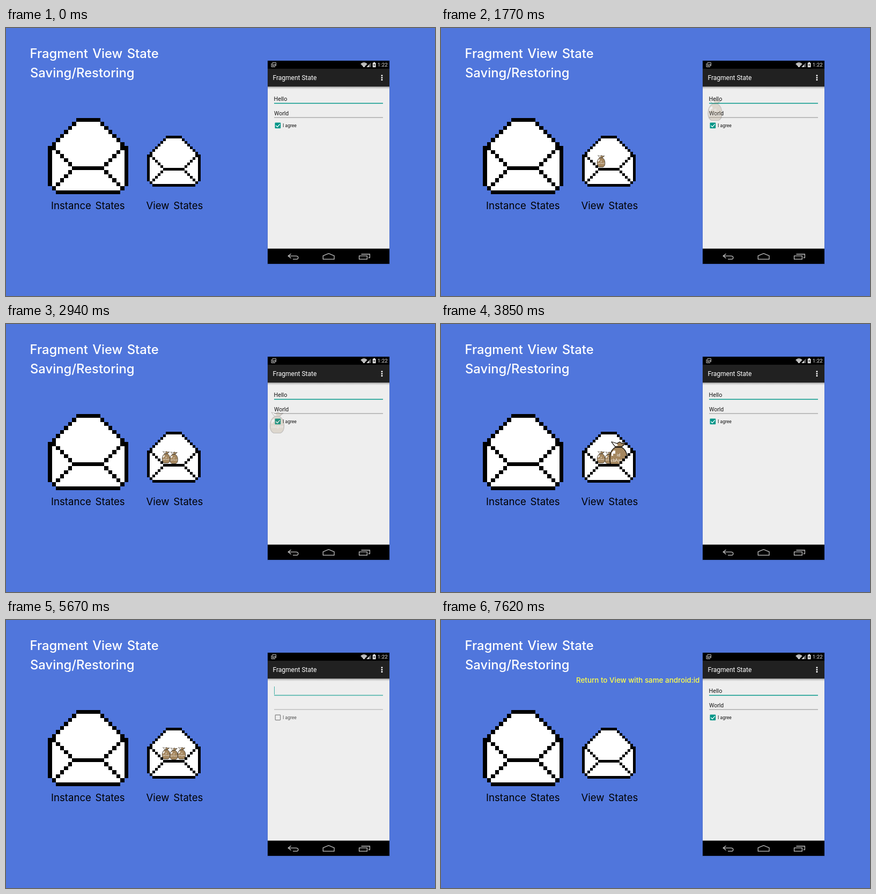
Animation of 800 by 500 pixels, one loop 8.65 s. Source, as an HTML page:

```html
<!DOCTYPE html>
<html lang="en">
<head>
<meta charset="utf-8">
<title>Fragment View State</title>
<style>
  html, body { margin: 0; width: 100%; height: 100%; overflow: hidden; background: #5076dc; }
  svg { display: block; width: 800px; height: 500px; }
  text { font-family: Inter, "Open Sans", sans-serif; }
  .ui text { font-family: Roboto, Arial, sans-serif; fill: #151515; }
  .ui .light { fill: #fff; }
  .title { font-size: 23.8px; font-weight: 500; word-spacing: 2px; fill: #fff; }
  .label { font-size: 18.6px; word-spacing: 2.5px; }
  .note { font-size: 13.4px; font-weight: 500; fill: #ffff48; }
  .line { fill: none; stroke: #c4c4c4; stroke-width: 1.3; }
  .tag { font-size: 7.3px; fill: #fff; text-anchor: middle; }
</style>
</head>
<body>
<svg viewBox="0 0 800 500">
  <defs>
    <linearGradient id="shade" x2="0" y2="1">
      <stop stop-color="#000" stop-opacity=".28"/>
      <stop offset="1" stop-color="#000" stop-opacity="0"/>
    </linearGradient>
    <g id="sack" stroke="#17120b" stroke-width="1.4" stroke-linejoin="round">
      <path d="M-6-14C-13-10-16.3-2-16.3 8C-16.3 18-13 22-8 24.3H8C13 22 16.3 18 16.3 8C16.3-2 13-10 6-14Z" fill="#a5875f"/>
      <path d="M-13-24L-6-15H6L14-22L7-21L2-24L-3-21Z" fill="#a5875f"/>
      <path d="M-12-23.5L-6-16L-1-17L-3-20.5Z" fill="#fff" stroke="none"/>
      <path d="M-9-8H-6V-2H-10V2H-13V-4Z" fill="#fff" stroke="none"/>
    </g>
  </defs>
  <rect width="800" height="500" fill="#5076dc"/>

  <text class="title" x="44.5" y="56">Fragment View State</text>
  <text class="title" x="45" y="92">Saving/Restoring</text>
  <text class="label" x="84" y="338">Instance States</text>
  <text class="label" x="261.5" y="338">View States</text>
  <g id="back" shape-rendering="crispEdges"></g>
  <text id="note" class="note" x="252" y="117">Return to View with same android:id</text>

  <g class="ui">
    <rect x="487" y="60.5" width="229" height="381" fill="#000" opacity=".07"/>
    <rect x="488" y="61" width="227" height="379" fill="#000"/>
    <rect x="488" y="76" width="227" height="34" fill="#212121"/>
    <rect x="488" y="109.4" width="227" height="302.2" fill="#eee"/>

    <g id="blank">
      <path d="M500.5 124V139" stroke="#009688"/>
      <path d="M500 140.5H703" stroke="#009688" stroke-width="1.3"/>
      <path d="M500 167H703" stroke="#8c8c8c"/>
      <rect x="502.2" y="177.2" width="9.4" height="9.4" rx=".8" fill="none" stroke="#555" stroke-width="1.2"/>
      <text x="516" y="185" font-size="8.6">I agree</text>
    </g>
    <g id="full">
      <rect x="489" y="116" width="225" height="80" fill="#eee"/>
      <text x="499.5" y="136" font-size="10.8">Hello</text>
      <path d="M500 140.5H703" stroke="#009688" stroke-width="1.3"/>
      <text x="500" y="163" font-size="10.5">World</text>
      <path d="M500 167H703" stroke="#8c8c8c"/>
      <rect x="501.5" y="176.6" width="10.7" height="10.7" rx="1" fill="#009688"/>
      <path d="M503.3 182L506 184.6L510.7 179.4" fill="none" stroke="#fff" stroke-width="1.4"/>
      <text x="516" y="185" font-size="8.6">I agree</text>
    </g>
    <rect x="488" y="109.4" width="227" height="4.6" fill="url(#shade)"/>

    <text class="light" x="497.5" y="97" font-size="12">Fragment State</text>
    <path d="M701 87.5V98" stroke="#fff" stroke-width="2.6" stroke-dasharray="2.6 1.3"/>
    <text x="692.8" y="72.3" font-size="9.8" style="fill:#e4e4e4">1:22</text>
    <path d="M495 66V72.5H502M497 64.6H503.4V70.4H497ZM498 69.6L499.8 67.4L501 68.8L502 67.6L503 69.6" class="line" style="stroke-width:1"/>
    <path d="M661.3 67Q667.5 61.5 673.7 67L667.5 73.6Z" fill="#e4e4e4"/>
    <path d="M662.8 68.2Q667.5 64.3 672.2 68.2M664.6 70Q667.5 67.6 670.4 70" fill="none" stroke="#000" stroke-width=".5"/>
    <path d="M680.4 64.6V73H672.5Z" fill="#666"/>
    <path d="M677 68.2V73H672.5Z" fill="#ddd"/>
    <path d="M683.8 65H685.4V63.8H688V65H689.6V73.2H683.8Z" fill="#e4e4e4"/>
    <path d="M687.2 66L685.2 69.4H686.8L686.2 72L688.2 68.6H686.7Z" fill="#000"/>
    <g class="line">
      <path d="M531.5 421.2L526.2 425.3L531.5 429.4M526.5 425.3H541Q544.8 425.3 544.8 428.4T541 431.4H535"/>
      <path d="M591.3 431.4V425L601.6 420.6L612 425V431.4Z"/>
      <path d="M658.6 425.2H673.4V431.4H658.6ZM662.5 422H678.4V428.6H675.6"/>
    </g>
  </g>

  <g id="sacks"></g>
  <g id="front" shape-rendering="crispEdges"></g>
</svg>
<script>
const $ = id => document.getElementById(id);
const LOOP = 8650, LEAD = 600, STEP = 130, LAST = 55;

// Envelopes on a 20 x 19 grid of cells, mirrored left to right.
const foldRow = c => c < 7 ? c + 6 : c > 12 ? 25 - c : 12;
const cell = (x, y, w = 1, h = 1) => `M${x} ${y}h${w}v${h}h${-w}z`;
const both = (x, y, h = 1) => cell(x, y, 1, h) + cell(19 - x, y, 1, h);

function flapPaths() {
  let ink = cell(7, 0, 6), paper = cell(1, 7, 18, 10);
  for (let r = 1; r < 7; r++) {
    ink += both(7 - r, r);
    paper += cell(7 - r, r, 6 + 2 * r);
  }
  return { ink, paper };
}

function pocketPaths() {
  let ink = both(0, 7, 10) + both(1, 17) + cell(2, 18, 16) + cell(6, 12, 8), paper = '';
  for (let c = 1; c < 6; c++) ink += both(c, foldRow(c)) + both(c, 18 - c);
  for (let c = 1; c < 19; c++) {
    const end = c === 1 || c === 18 ? 17 : 18;
    paper += cell(c, foldRow(c), 1, end - foldRow(c));
  }
  return { ink, paper };
}

const draw = (p, x, y, size) =>
  `<g transform="translate(${x} ${y}) scale(${size})"><path d="${p.paper}" fill="#fff"/><path d="${p.ink}"/></g>`;

const flap = flapPaths(), pocket = pocketPaths();
$('back').innerHTML = draw(flap, 78, 167.6, 7.5) + draw(pocket, 78, 167.6, 7.5) + draw(flap, 263, 201, 5);
$('front').innerHTML = draw(pocket, 263, 201, 5);

// Each sack: first step, field, place in the envelope, way back to the field.
const sacks = [
  { tag: 'edtText1', start: 1, from: [511, 121], rest: [298.5, 248.5], mid: 129, home: 129 },
  { tag: 'edtText2', start: 10, from: [511, 153], rest: [313, 249.5], mid: 169, home: 159 },
  { tag: 'cbAgree', start: 19, from: [505.5, 184], rest: [327.5, 248.5], mid: 208.5, home: 182 }
];
$('sacks').innerHTML = sacks.map(s =>
  `<g><use href="#sack"/><text class="tag" y="3">id</text><text class="tag" y="13">${s.tag}</text></g>`).join('');
sacks.forEach((s, i) => {
  s.el = $('sacks').children[i];
  const [x, y] = s.from, [rx, ry] = s.rest, a = s.start;
  s.x = [[a, x], [a + 2, x], [a + 3, x - 20], [a + 6, rx + 20], [a + 7, rx + 3.5], [a + 9, rx], [41, rx], [48, rx + 210]];
  s.y = [[a, y], [a + 2, y - 3], [a + 7, 244], [a + 9, ry], [41, ry], [45, s.mid], [48, s.home]];
  s.size = [[a, .8], [a + 7, 1], [a + 9, .45]];
  s.alpha = [[a - 1, 0], [a, .22], [a + 2, 1], [48, 1], [50, 0]];
});

const fades = {
  full: [[28, 1], [34, 0], [49, 0], [55, 1]],
  blank: [[35, 0], [42, 1]],
  note: [[43, 0], [49, 1]]
};

function at(keys, n) {
  if (n <= keys[0][0]) return keys[0][1];
  for (let i = 1; i < keys.length; i++) {
    const [a, v] = keys[i - 1], [b, w] = keys[i];
    if (n <= b) return v + (w - v) * (n - a) / (b - a);
  }
  return keys[keys.length - 1][1];
}

function render(time) {
  const t = time % LOOP;
  const n = t < LEAD ? 0 : Math.min(LAST, Math.floor((t - LEAD) / STEP) + 1);
  for (const id in fades) $(id).setAttribute('opacity', at(fades[id], n));
  for (const s of sacks) {
    s.el.setAttribute('transform', `translate(${at(s.x, n)} ${at(s.y, n)}) scale(${at(s.size, n)})`);
    s.el.setAttribute('opacity', at(s.alpha, n));
  }
}

const begin = performance.now();
function tick() {
  render(performance.now() - begin);
  requestAnimationFrame(tick);
}
tick();
</script>
</body>
</html>
```
